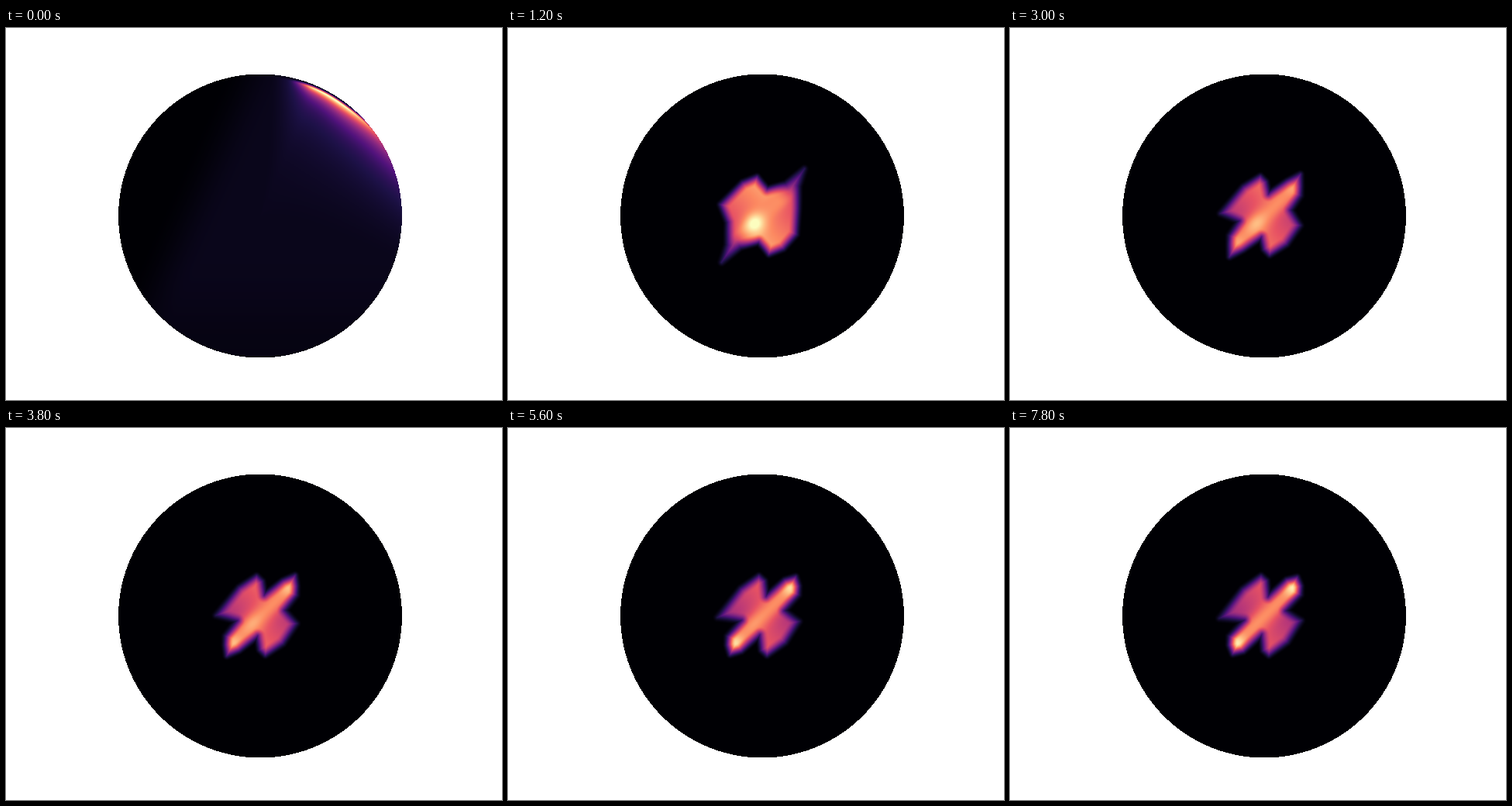
Recreate the animation shown at these times as an HTML page with a canvas. Size 640x480 px, loop 8000 ms.

```html
<!DOCTYPE html>
<html lang="en">
<head>
<meta charset="utf-8">
<title>Density on a disc</title>
<style>
  html, body { margin: 0; width: 100%; height: 100%; overflow: hidden; background: #fff; }
  canvas { display: block; }
</style>
</head>
<body>
<canvas id="stage" width="640" height="480"></canvas>
<script>
const W = 640, H = 480, LOOP = 8000, STEP = 200;
const DISC = { x: 328, y: 242.5, r: 182.95 };
const STAR = { x: 329, y: 242 };
const ctx = document.getElementById('stage').getContext('2d');

const clamp = v => Math.min(1, Math.max(0, v));
const mix = (a, b, k) => a + (b - a) * k;
const smooth = (a, b, v) => { const k = clamp((v - a) / (b - a)); return k * k * (3 - 2 * k); };
const bell = (v, width) => Math.exp(-((v / width) ** 2));

// Dark violet to cream colour ramp.
const RAMP = ['000004', '1d1147', '51127c', '832681', 'b73779', 'e75263', 'fc8961', 'fec488', 'fcfdbf']
  .map(hex => [0, 2, 4].map(i => parseInt(hex.slice(i, i + 2), 16)));
function tint(v, channel) {
  const p = clamp(v) * (RAMP.length - 1), i = Math.min(RAMP.length - 2, Math.floor(p));
  return mix(RAMP[i][channel], RAMP[i + 1][channel], p - i);
}

// Opening glow: a thin streak just inside the upper right rim, fanning out clockwise.
function rimGlow(x, y) {
  const dx = x - DISC.x, dy = y - DISC.y;
  const angle = Math.max(0, Math.atan2(dx, -dy) * 180 / Math.PI);
  const depth = DISC.r - Math.hypot(dx, dy);
  const ridge = 4.5 * smooth(60, 35, angle);
  const inside = Math.max(0, depth - ridge);
  const base = 0.042 * smooth(-130, -50, dx + dy * 0.45) * (1 - 0.4 * smooth(60, 185, dy));
  const streak = 0.82 * smooth(11, 23, angle) * bell(angle - 32, 26) * Math.exp(-inside / (2 + angle * 0.2));
  const halo = 0.22 * smooth(4, 25, angle) * smooth(110, 45, angle) * Math.exp(-inside / 42);
  return base + (streak + halo) * smooth(ridge - 4, ridge + 0.5, depth);
}

// Comet-like blob whose tail bends down to the left.
function blob(x, y, zoom) {
  const dx = (x - 339) / zoom, dy = (y - 224) / zoom, tail = Math.max(0, dy);
  const off = dx + 0.0045 * tail ** 2;
  const reach = off < 0 ? 40 + 40 * Math.exp(-tail / 45) : 22 + 24 * Math.exp(-tail / 60);
  return smooth(-34, 0, dy) * Math.exp(-((tail / 58) ** 1.5)) * smooth(reach, 0, Math.abs(off));
}

// Half of the star's outline as offsets from its centre, early and late.
// The other half is the same turned by 180 degrees.
const HALF = [
  [[-7, -50], [-5, -51]],
  [[0, -42], [2, -45]],
  [[5, -31], [4, -24]],
  [[29, -42], [28, -46]],
  [[50, -57], [41, -49]],
  [[46, -38], [46, -38]],
  [[46, -25], [46, -27]],
  [[40, -8], [26, -6]],
  [[50, 14], [53, 1]],
  [[27, 40], [29, 34]]
];
const WING = 8;

function outlineAt(age) {
  return [1, -1].flatMap(side => HALF.map(([early, late], i) => {
    const lean = i === WING ? side : 0;
    return [
      side * (mix(early[0], late[0], age) - 6 * lean),
      side * (mix(early[1], late[1], age) + 5 * lean)
    ];
  }));
}

// Signed distance to the outline, positive inside.
function depthIn(outline, x, y) {
  let best = Infinity, inside = false;
  outline.forEach(([ax, ay], i) => {
    const [bx, by] = outline[(i + 1) % outline.length], ex = bx - ax, ey = by - ay;
    const k = clamp(((x - ax) * ex + (y - ay) * ey) / (ex * ex + ey * ey));
    best = Math.min(best, Math.hypot(x - ax - ex * k, y - ay - ey * k));
    if ((ay > y) !== (by > y) && x < ax + ex * (y - ay) / ey) inside = !inside;
  });
  return inside ? best : -best;
}

// A bright diagonal bar between two dimmer wings; its heat moves out to the ends with age.
function star(outline, age, x, y) {
  const dx = x - STAR.x, dy = y - STAR.y;
  if (Math.hypot(dx, dy) > 95) return 0;
  const mask = smooth(-7, 11, depthIn(outline, dx, dy));
  if (!mask) return 0;
  const along = (dx - dy) * Math.SQRT1_2, across = (dx + dy) * Math.SQRT1_2;
  const wing = mix(0.67, 0.54, age) - 0.0035 * along * Math.sign(across) * smooth(0, 15, Math.abs(across));
  const core = 0.2 * (1 - age) * bell(along + 15, 14);
  const ends = 0.22 * age * bell(Math.abs(along) - 51, 11);
  const bar = 0.76 + core + ends - 0.25 * (1 - age) * smooth(25, 75, Math.abs(along));
  return mask * mix(wing, bar, bell(across, 13));
}

function fieldAt(step) {
  if (step === 0) return rimGlow;
  const zoom = 1 + 0.3 * Math.max(0, 3 - step);
  if (step <= 3) return (x, y) => blob(x, y, zoom);
  const age = Math.max(-0.4, 1 - Math.exp((9 - step) / 9));
  const outline = outlineAt(age), formed = clamp((step - 3) / 3);
  return (x, y) => mix(formed < 1 ? blob(x, y, 1) : 0, star(outline, age, x, y), formed);
}

function draw(step) {
  const field = fieldAt(step), image = ctx.createImageData(W, H), data = image.data;
  data.fill(255);
  for (let y = 60; y < 425; y++) {
    for (let x = 145; x < 511; x++) {
      if (Math.hypot(x + 0.5 - DISC.x, y + 0.5 - DISC.y) > DISC.r) continue;
      const v = field(x + 0.5, y + 0.5), at = (y * W + x) * 4;
      for (let c = 0; c < 3; c++) data[at + c] = tint(v, c);
    }
  }
  ctx.putImageData(image, 0, 0);
}

let shown = 0;
const start = performance.now();
draw(shown);
function tick() {
  const step = Math.floor((performance.now() - start) % LOOP / STEP);
  if (step !== shown) draw(shown = step);
  requestAnimationFrame(tick);
}
requestAnimationFrame(tick);
</script>
</body>
</html>
```
